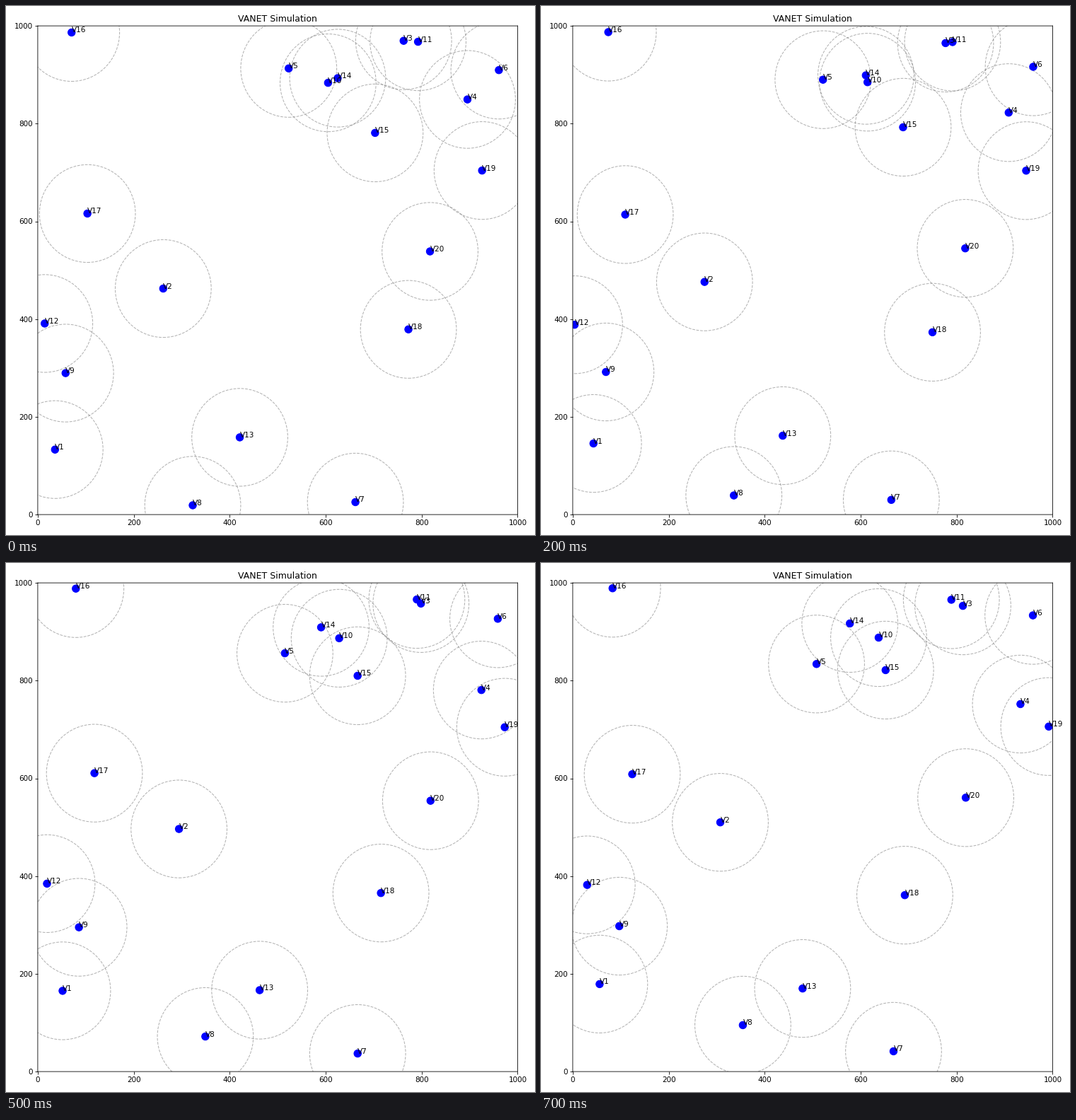
A matplotlib script for the animation above (0.8 s loop, 748x748 px).

```python
import matplotlib.pyplot as plt
from matplotlib.animation import FuncAnimation

SIZE, DPI = 748, 74.8
FRAMES, INTERVAL = 8, 100
RANGE = 100      # radio range of a vehicle
WALL = 3.5       # vehicles turn back here on the left side

# V1, V2, ...: start and end as x + yj, optionally the bulge to the left
ROUTES = [
    (36 + 133j, 56 + 179j, -2),
    (261.5 + 462.5j, 307.5 + 510j),
    (762.5 + 969.5j, 813 + 953j),
    (895.5 + 849.5j, 933 + 752j, 3),
    (523 + 913j, 508 + 834j, 3.5),
    (961 + 909.5j, 959 + 933.5j, 1),
    (662 + 25.5j, 668.5 + 41.5j),
    (323 + 19j, 354.5 + 95j, -5),
    (58 + 289.5j, 97 + 297.5j),
    (605 + 883.5j, 637.5 + 888j),
    (792.5 + 967.5j, 789 + 965.5j),
    (14.5 + 391j, -23 + 382j),
    (421 + 158j, 479 + 170j),
    (625 + 893j, 577.5 + 917j, 1.5),
    (703 + 781j, 652 + 821.5j),
    (70.5 + 986.5j, 83 + 989j),
    (103.5 + 616j, 124 + 608.5j),
    (772.5 + 379j, 692 + 361j, 1),
    (926 + 704j, 992 + 706j, -1),
    (817.5 + 538.5j, 819 + 560.5j),
]


def position(start, end, bulge=0, *, progress):
    """Point on a gently curved drive, mirrored at the left wall."""
    drive = end - start
    sideways = 1j * drive / abs(drive)
    point = (start + drive * progress
             + sideways * bulge * 4 * progress * (1 - progress))
    return WALL + abs(point.real - WALL), point.imag


plt.rcParams["font.family"] = "DejaVu Sans"
fig, ax = plt.subplots(figsize=(SIZE / DPI, SIZE / DPI), dpi=DPI)
fig.subplots_adjust(left=44.9 / SIZE, right=723.4 / SIZE,
                    bottom=1 - 719.1 / SIZE, top=1 - 28.1 / SIZE)
ax.set(xlim=(0, 1000), ylim=(0, 1000), title="VANET Simulation")
for spine in ax.spines.values():
    spine.set_snap(False)

count = len(ROUTES)
circles = [ax.add_patch(plt.Circle((0, 0), RANGE, fill=False, color="gray",
                                   linestyle="--", alpha=0.6))
           for _ in ROUTES]
# One size per dot keeps the dots from snapping to whole pixels
dots = ax.scatter([0] * count, [0] * count, s=[100] * count, color="blue")
labels = [ax.text(0, 0, f"V{i + 1}", fontsize=10) for i in range(count)]


def update(step):
    progress = step / (FRAMES - 1)
    points = [position(*route, progress=progress) for route in ROUTES]
    dots.set_offsets(points)
    for point, circle, label in zip(points, circles, labels):
        circle.center = point
        label.set_position(point)
    return [dots, *circles, *labels]


anim = FuncAnimation(fig, update, frames=FRAMES, interval=INTERVAL,
                     repeat=True, repeat_delay=0)
plt.show()
```
